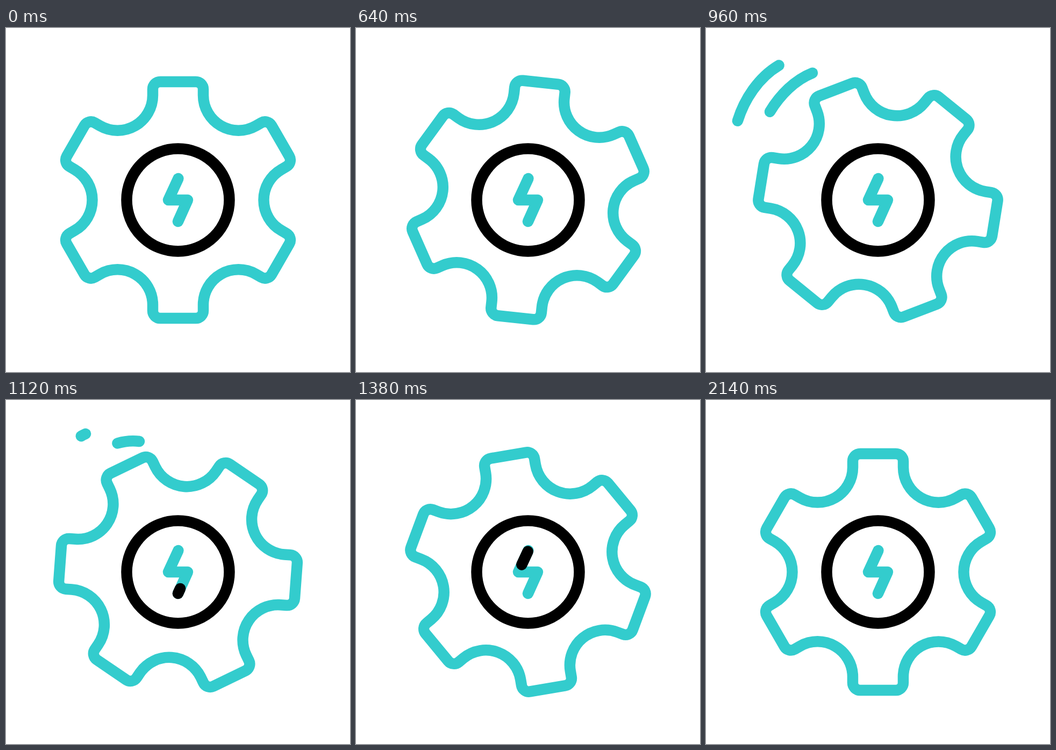
These frames come from a looping animation (640 by 640 pixels, 3000 ms). An HTML page:

```html
<!DOCTYPE html>
<html lang="en">
<head>
<meta charset="utf-8">
<title>Energy gear</title>
<style>
  html, body { margin: 0; width: 100%; height: 100%; overflow: hidden; background: #fff; }
  svg { display: block; width: 100%; height: 100%; }
  path, circle { fill: none; stroke: #33cccd; stroke-width: 20.5; stroke-linecap: round; stroke-linejoin: round; }
  .dark { stroke: #000; }
</style>
</head>
<body>
<svg viewBox="0 0 640 640">
  <path id="outer" pathLength="1" d="M55 187C66 139 98 86 148 63"/>
  <path id="inner" pathLength="1" d="M112 168C138 118 188 70 248 77"/>
  <path id="gear"/>
  <circle class="dark" cx="320" cy="320" r="95.5"/>
  <path d="M320 360L338 320H302L320.5 280"/>
  <path id="spark" class="dark" pathLength="1" d="M320 360L338 320H302L320.5 280"/>
</svg>
<script>
const LOOP = 3000, STEP = 20;
const el = id => document.getElementById(id);
const clamp = x => Math.min(1, Math.max(0, x));
const progress = (t, from, to) => clamp((t - from) / (to - from));
const smooth = (t, from, to) => {
  const u = progress(t, from, to);
  return u * u * (3 - 2 * u);
};

// Ease with horizontal handles of lengths a (start) and b (end).
function ease(u, a, b) {
  let lo = 0, hi = 1;
  for (let i = 0; i < 30; i++) {
    const s = (lo + hi) / 2, r = 1 - s;
    const x = 3 * s * r * r * a + 3 * s * s * r * (1 - b) + s * s * s;
    if (x < u) lo = s; else hi = s;
  }
  return lo * lo * (3 - 2 * lo);
}

// Six teeth with rounded corners, joined by concave arcs.
function gearPath() {
  const corner = "A14 14 0 0 1 ", groove = "A65.5 65.5 0 0 0 ";
  let d = "";
  for (let k = 0; k < 6; k++) {
    const c = Math.cos(k * Math.PI / 3), s = Math.sin(k * Math.PI / 3);
    const at = (x, y) => `${(x * c - y * s).toFixed(2)} ${(x * s + y * c).toFixed(2)}`;
    d += (k ? groove : "M") + at(-47, -194.86) + "L" + at(-47, -206) +
      corner + at(-33, -220) + "L" + at(33, -220) +
      corner + at(47, -206) + "L" + at(47, -194.86);
  }
  return d + groove + "-47 -194.86Z";
}

// Show only the part of a path between two fractions of its length.
function trim(id, start, end) {
  const { style } = el(id);
  style.visibility = end - start > 0.002 ? "visible" : "hidden";
  style.strokeDasharray = `${Math.max(0, end - start)} 2`;
  style.strokeDashoffset = -start;
}

function draw(t) {
  const angle = 186.1 * ease(progress(t, 320, 1755), 0.816, 0.667) - 6.1 * smooth(t, 1755, 2150);
  el("gear").setAttribute("transform", `translate(320 320) rotate(${angle})`);
  trim("outer", smooth(t, 915, 1155), smooth(t, 780, 1000));
  trim("inner", smooth(t, 905, 1219), smooth(t, 790, 1055));
  trim("spark", smooth(t, 1147, 1487), smooth(t, 1060, 1405));
}

el("gear").setAttribute("d", gearPath());
const begin = performance.now();
function tick() {
  const t = (performance.now() - begin) % LOOP;
  draw(Math.floor(t / STEP) * STEP);
  requestAnimationFrame(tick);
}
tick();
</script>
</body>
</html>
```
